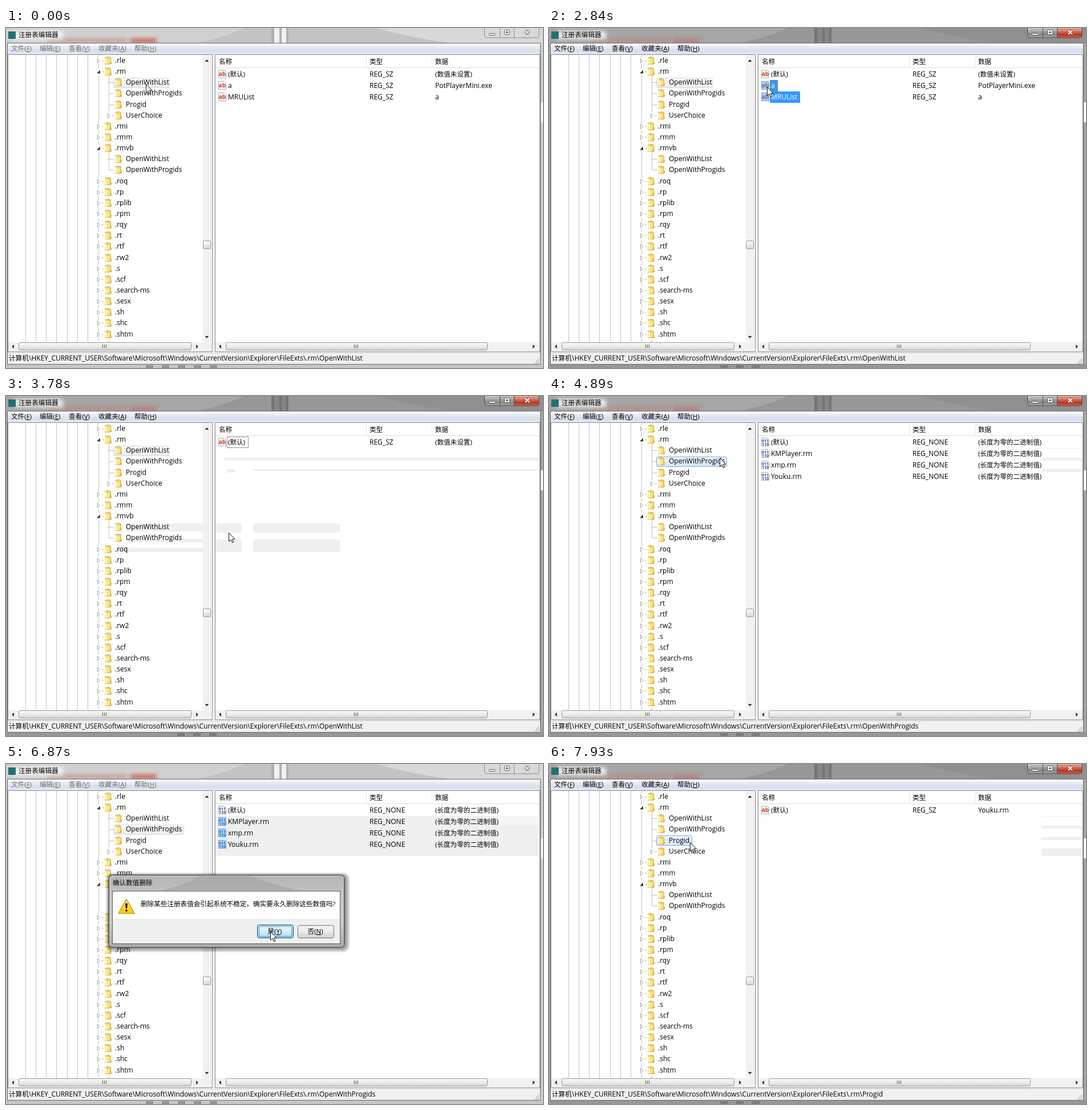
These frames come from a looping animation (941x595 px, 8000 ms). An HTML page:

```html
<!DOCTYPE html>
<html lang="zh">
<head>
<meta charset="utf-8">
<title>注册表编辑器</title>
<style>
html, body { margin: 0; width: 100%; height: 100%; overflow: hidden; background: #fff; }
svg { display: block; }
text { font-family: "Open Sans", "Noto Sans CJK SC", "Noto Sans CJK", sans-serif; font-size: 12px; fill: #000; white-space: pre; }
</style>
</head>
<body>
<svg id="stage" width="941" height="595" viewBox="0 0 941 595">
  <defs>
    <filter id="soft" x="-30%" y="-60%" width="160%" height="220%"><feGaussianBlur stdDeviation="3"/></filter>
  </defs>
  <g id="frame"></g>
  <g id="panes"></g>
  <g id="ghost"></g>
  <g id="mark"></g>
  <g id="tree"></g>
  <g id="list"></g>
  <g id="status"></g>
  <g id="dialog"></g>
  <path id="cursor" d="M.5 .5v15l3.5-3.3 2.5 5.3 2.3-1-2.4-5.2h4.6z" fill="#fff" stroke="#111" stroke-linejoin="round"/>
</svg>
<script>
const LOOP = 8000;
const $ = id => document.getElementById(id);

// ---- drawing helpers ----
const rect = (x, y, w, h, fill, extra = '') =>
  `<rect x="${x}" y="${y}" width="${w}" height="${h}" fill="${fill}" ${extra}/>`;
const box = (x, y, w, h, fill, stroke, r = 0) =>
  rect(x + .5, y + .5, w - 1, h - 1, fill, `stroke="${stroke}" rx="${r}"`);
const path = (d, fill, extra = '') => `<path d="${d}" fill="${fill}" ${extra}/>`;
const dots = d => path(d, 'none', 'stroke="#858585" stroke-dasharray="1 1"');
const text = (x, y, s, fill = '#000', extra = '') => {
  const size = /[\u4e00-\u9fff]/.test(s) ? 11.6 : 12;
  return `<text x="${x}" y="${y + 4}" style="font-size:${size}px;fill:${fill}" ${extra}>${s}</text>`;
};
const hotkey = s => s.replace(/\((\w)\)/, '(<tspan text-decoration="underline">$1</tspan>)');
const gradient = (id, ...stops) => {
  const list = stops.map((c, i) => `<stop offset="${i / (stops.length - 1)}" stop-color="${c}"/>`);
  return `<linearGradient id="${id}" x2="0" y2="1">${list.join('')}</linearGradient>`;
};

$('stage').querySelector('defs').insertAdjacentHTML('beforeend',
  gradient('menuFill', '#fbfcfe', '#e6ebf5', '#d6deed', '#e3e8f3') +
  gradient('thumb', '#f8f8f8', '#ececec', '#d3d3d3') +
  gradient('focus', '#edf5fe', '#d2e5fc') +
  gradient('blur', '#fafafa', '#ececec') +
  gradient('push', '#f4f4f4', '#ebebeb', '#d0d0d0') +
  gradient('pushHot', '#eaf6fd', '#d5effc', '#a9dbf5') +
  gradient('closeFill', '#e5a497', '#d27868', '#b8351f', '#d2603f') +
  gradient('glassBtn', '#c4c4c4', '#a8a8a8', '#868686', '#a4a4a4') +
  gradient('warn', '#ffe95a', '#fcc80c') +
  gradient('dialogGlass', '#b4b4b4', '#c6c6c6', '#c9c9c9', '#a5a5a5'));

// ---- window frame ----
function frame(active) {
  const tone = active
    ? { base: '#a6a6a6', wedge: '#979797', band: '#858585', edge: '#747474', right: '#8f8f8f', foot: '#979797', ink: '#000' }
    : { base: '#d0d0d0', wedge: '#c3c3c3', band: '#f1f1f1', edge: '#b0b0b0', right: '#d8d8d8', foot: '#c6c6c6', ink: '#6d6d6d' };
  let s = rect(0, 0, 941, 595, tone.base);
  s += path('M325 27Q375 20 418 0H650Q720 20 790 27z', tone.wedge);
  s += path('M650 0Q720 20 790 27H941V0z', tone.right);
  s += rect(465, 0, 30, 27, tone.edge) + rect(470, 0, 9, 27, tone.band) + rect(483, 0, 8, 27, tone.band);
  s += `<g filter="url(#soft)">` + rect(72, 18, 140, 8, '#b98078', 'opacity=".55"') +
    rect(218, 18, 46, 9, '#c9493f', `opacity="${active ? .4 : .7}"`) +
    rect(14, 5, 86, 15, '#fff', 'opacity=".7"') + '</g>';
  s += rect(0, 589, 941, 6, tone.foot);
  for (let x = active ? 300 : 245; x < 365; x += 28) s += rect(x, 590, 13, 5, '#555', 'opacity=".45"');
  s += rect(937, 130, 4, 35, '#f4f4f4');
  s += rect(4, 6, 13, 13, '#23706f') + text(22, 12, '注册表编辑器');

  const [line, fill] = active ? ['#4f4f4f', 'url(#glassBtn)'] : ['#8b8b8b', '#dadada'];
  s += path('M838.5 0V13q0 4 4 4H865.5V0', fill, `stroke="${line}"`);
  s += rect(865.5, -1, 25, 18, fill, `stroke="${line}"`);
  s += path('M890.5 0V17H930q4 0 4-4V0', active ? 'url(#closeFill)' : fill, `stroke="${line}"`);
  s += box(846, 9, 12, 4, '#fff', '#555', 1);
  s += box(873, 3, 10, 9, '#fff', '#555', 1) + box(876, 6, 4, 3, '#aaa', '#555');
  const cross = 'M910 4l7 7m0-7l-7 7';
  s += path(cross, 'none', 'stroke="#555" stroke-width="4"') + path(cross, 'none', 'stroke="#fff" stroke-width="2"');

  s += box(2, 26, 935, 563, '#f0f0f0', '#686868');
  s += rect(3, 27, 933, 19, 'url(#menuFill)') + rect(3, 46, 933, 1, '#f4f4f4');
  const menu = { 9: '文件(F)', 59: '编辑(E)', 110: '查看(V)', 162: '收藏夹(A)', 225: '帮助(H)' };
  for (const x in menu) s += text(+x, 36, menu[x], tone.ink).replace(/\(\w\)/, hotkey);
  return s;
}

// ---- panes, scroll bars, header ----
function arrow(x, y, turn) {
  return path('M-3.5 -2h7L0 2z', '#333', `transform="translate(${x} ${y}) rotate(${turn})"`);
}
function hbar(x, w, thumbX, thumbW, grip, end) {
  let s = rect(x, 550, w, 15, '#f1f1f1') + arrow(x + 8, 557.5, 90) + arrow(end, 557.5, -90);
  s += box(thumbX, 550, thumbW, 14, 'url(#thumb)', '#979797', 2);
  for (let i = 0; i < 3; i++) s += rect(grip + i * 3, 554, 1, 6, '#555');
  return s;
}
function panes() {
  let s = box(3, 46, 359, 521, '#fff', '#828790') + box(366, 46, 570, 521, '#fff', '#828790');
  s += rect(345, 47, 15, 503, '#f1f1f1') + arrow(352, 57, 180) + arrow(352, 541, 0);
  s += box(345, 372, 14, 15, 'url(#thumb)', '#979797', 2);
  s += hbar(4, 341, 22, 303, 169, 335) + rect(345, 550, 15, 16, '#f0f0f0');
  s += hbar(367, 568, 385, 459, 610, 925);
  s += text(373, 59, '名称') + text(637, 59, '类型') + text(752, 59, '数据');
  s += rect(631, 48, 1, 21, '#e3e6ea') + rect(746, 48, 1, 21, '#e3e6ea') + rect(367, 69, 568, 1, '#dcdcdc');
  s += rect(3, 568, 933, 1, '#d7d7d7');
  for (let i = 0; i < 3; i++)
    for (let j = 0; j <= i; j++) s += rect(932 - j * 3, 579 + i * 3, 2, 2, '#b8b8b8');
  return s;
}

// ---- key tree ----
const rowY = i => Math.round(57 + 19.14 * i);
const keys = ('.rle .rm >OpenWithList >OpenWithProgids >Progid >UserChoice .rmi .rmm .rmvb >OpenWithList ' +
  '>OpenWithProgids .roq .rp .rplib .rpm .rqy .rt .rtf .rw2 .s .scf .search-ms .sesx .sh .shc .shtm .shtml').split(' ');
const folder = (x, y) => `<g transform="translate(${x} ${y - 7})">` +
  path('M1.5 1.5L8 .5 11.5 2V13.5H1.5z', '#f0cf62', 'stroke="#d5b04a"') +
  path('M1 2L5.500 4V14L1 12.500z', '#fdf2b4') + path('M6 4H10V12H6z', '#f9e48d') +
  rect(10, 9, 3, 4, '#e3b93c') + '</g>';
function tree() {
  let s = '';
  for (let i = 0; i < 7; i++) s += dots(`M${Math.round(34 + i * 18.15) + .5} 48V549`);
  s += dots('M162.5 48V549') + dots(`M180.5 84V${rowY(5)}`) + dots(`M180.5 218V${rowY(10)}`);
  keys.forEach((key, i) => {
    const y = rowY(i), child = key[0] === '>', x = child ? 190 : 172;
    s += dots(`M${x - 10} ${y + .5}H${x}`);
    if (!child || key === '>UserChoice') {
      const open = keys[i + 1]?.[0] === '>' && !child;
      s += rect(x - 13, y - 5, 8, 11, '#fff');
      s += open ? path(`M${x - 7} ${y - 2.5}v6h-6z`, '#333')
        : path(`M${x - 11.5} ${y - 3.5}l4 4-4 4z`, '#fff', 'stroke="#a0a0a0"');
    }
    s += folder(x, y) + text(child ? 210 : 191, y, key.replace('>', ''));
  });
  return `<svg x="4" y="48" width="341" height="501" viewBox="4 48 341 501">${s}</svg>`;
}
const marks = { OpenWithList: [87, 99], OpenWithProgids: [106, 124], Progid: [125, 63] };
function mark(key, focus) {
  const [y, w] = marks[key];
  return focus ? box(188, y, w, 18, 'url(#focus)', '#84acdd', 2) : box(188, y, w, 18, 'url(#blur)', '#d9d9d9', 2);
}

// ---- value list ----
const none = name => [name, 'REG_NONE', '(长度为零的二进制值)'];
const unset = ['(默认)', 'REG_SZ', '(数值未设置)'];
const lists = {
  full: [unset, ['a', 'REG_SZ', 'PotPlayerMini.exe'], ['MRUList', 'REG_SZ', 'a']],
  empty: [unset],
  progids: ['(默认)', 'KMPlayer.rm', 'xmp.rm', 'Youku.rm'].map(none),
  progid: [['(默认)', 'REG_SZ', 'Youku.rm']]
};
const nameWidth = { a: 14, MRUList: 53, 'KMPlayer.rm': 78, 'xmp.rm': 49, 'Youku.rm': 60 };
function icon(y, binary, picked) {
  let s = path(`M372.5 ${y - 7.5}h10l3 3v11h-13z`, '#fff', 'stroke="#a9a9a9"');
  const label = (dy, t, c, size) => `<text x="379" y="${y + dy}" text-anchor="middle" style="font-size:${size}px;font-weight:700;fill:${c}">${t}</text>`;
  s += binary ? label(-.5, '011', '#2149a8', 7) + label(5.5, '110', '#2149a8', 7) : label(2.5, 'ab', '#d3361c', 10);
  return s + (picked ? rect(372, y - 8, 14, 15, '#3399ff', 'opacity=".45"') : '');
}
function list({ rows, picked, last, lit, dotted }) {
  return lists[rows].map(([name, type, data], i) => {
    const y = 81 + i * 20, on = picked.includes(i), blue = on && lit;
    let s = '';
    if (blue) s += rect(387, y - 10, nameWidth[name], 20, '#3399ff');
    if (blue && last === i) s += rect(387.5, y - 9.5, nameWidth[name] - 1, 19, 'none', 'stroke="#cc6600" stroke-dasharray="1 1"');
    if (dotted && !i) s += rect(387.5, 71.5, 37, 19, 'none', 'stroke="#222" stroke-dasharray="1 1"');
    return s + icon(y, type === 'REG_NONE', on) + text(389, y, name, blue ? '#fff' : '#000') +
      text(637, y, type) + text(752, y, data);
  }).join('');
}

// Faint bands left on the panes by the closing message box
const band = (x, y, x2, y2) => rect(x, y, x2 - x, y2 - y, '#efefef');
const rightBands = band(863, 91, 934, 92) + band(863, 108, 934, 113) + band(863, 128, 934, 133);
const ghosts = {
  none: '',
  first: band(383, 108, 934, 113) + band(387, 128, 401, 134) + band(433, 128, 934, 131) +
    [368, 433].map(x => band(x, 223, x < 400 ? 413 : 585, 239) + band(x, 251, x < 400 ? 413 : 585, 273)).join('') +
    band(210, 223, 345, 237) + band(210, 250, 345, 256) + band(188, 266, 345, 273),
  side: rightBands,
  rows: band(368, 91, 934, 161) + rect(863, 92, 71, 16, '#f6f6f6'),
  last: rightBands + band(863, 148, 934, 161)
};

// ---- message box ----
function dialog() {
  let s = '';
  for (let i = 6; i > 0; i--) s += rect(181 - i, 196 - i, 412 + i * 2.6, 125 + i * 2.4, '#000', `rx="${6 + i}" opacity=".09"`);
  s += box(180, 194, 413, 127, 'url(#dialogGlass)', '#222', 6);
  s += path('M270 221Q315 212 340 196H430Q470 214 520 221z', '#999', 'opacity=".45"');
  s += rect(181.5, 195.5, 410, 124, 'none', 'stroke="#e8e8e8" rx="5" opacity=".8"');
  s += box(186, 222, 400, 93, '#fff', '#5c5c5c') + rect(187, 272, 398, 42, '#f0f0f0') + rect(187, 272, 398, 1, '#dfdfdf');
  s += text(187, 208, '确认数值删除') + text(236, 245, '删除某些注册表值会引起系统不稳定。确实要永久删除这些数值吗?');
  s += path('M211 236.500L225 261.500H197z', 'url(#warn)', 'stroke="#c79a1c" stroke-width="1.5" stroke-linejoin="round"');
  s += path('M209 244h4l-1 9h-2z', '#111') + '<circle cx="211" cy="256.500" r="1.800" fill="#111"/>';
  s += box(440, 281, 64, 24, 'url(#pushHot)', '#2c628b', 3) + rect(441.5, 282.5, 61, 21, 'none', 'stroke="#48c5ee" rx="2"');
  s += rect(443.5, 284.5, 57, 17, 'none', 'stroke="#333" stroke-dasharray="1 1"');
  s += box(511, 282, 64, 23, 'url(#push)', '#707070', 3);
  const label = (x, t) => text(x, 293, t, '#000', 'text-anchor="middle"').replace(/\(\w\)/, hotkey);
  return s + label(471, '是(Y)') + label(542, '否(N)');
}

// ---- timeline ----
const events = [
  [0, { active: false, key: 'OpenWithList', focus: false, rows: 'full', picked: [], last: -1, lit: true, dotted: false, ghost: 'none', ask: false }],
  [1100, { active: true, focus: true }],
  [1870, { focus: false, picked: [2], last: 2 }],
  [2300, { picked: [1, 2], last: 1 }],
  [3120, { active: false, ask: true, lit: false }],
  [3640, { ask: false, rows: 'empty', picked: [], lit: true, ghost: 'first' }],
  [3780, { active: true, dotted: true }],
  [4610, { key: 'OpenWithProgids', focus: true, rows: 'progids', dotted: false, ghost: 'side' }],
  [5340, { focus: false, picked: [1, 2], last: 2 }],
  [5490, { picked: [1, 2, 3], last: 3 }],
  [6260, { active: false, ask: true, lit: false, ghost: 'rows' }],
  [7020, { ask: false, rows: 'progids', picked: [], lit: true, ghost: 'last' }],
  [7150, { active: true }],
  [7540, { key: 'Progid', focus: true, rows: 'progid' }]
];
// start, end, steps, target x, target y
const moves = [
  [270, 390, 2, 215, 98], [670, 670, 1, 228, 98], [1350, 1590, 3, 415, 122],
  [1870, 2440, 5, 383, 104], [2840, 2840, 1, 382, 103], [3250, 3510, 3, 463, 292],
  [3640, 3780, 2, 390, 239], [3900, 4020, 2, 290, 160], [4170, 4460, 3, 255, 111],
  [4750, 5190, 4, 430, 100], [5340, 5490, 2, 402, 143], [6410, 6870, 4, 463, 293],
  [7150, 7410, 3, 225, 134], [7670, 7800, 2, 370, 99], [7930, 7930, 1, 247, 137]
];
function pointer(t) {
  let x = 245, y = 98;
  for (const [from, to, n, tx, ty] of moves) {
    if (t < from) break;
    const gap = (to - from) / (n - 1 || 1) || 1;
    const k = Math.min(n, Math.floor((t - from) / gap + 1e-6) + 1) / n;
    x += (tx - x) * k;
    y += (ty - y) * k;
  }
  return [Math.round(x), Math.round(y)];
}
const stateAt = t => Object.assign({}, ...events.filter(([at]) => at <= t).map(e => e[1]));

const shown = {};
function put(id, html) {
  if (shown[id] === html) return;
  shown[id] = html;
  $(id).innerHTML = html;
}
const root = '\\HKEY_CURRENT_USER\\Software\\Microsoft\\Windows\\CurrentVersion\\Explorer\\FileExts\\.rm\\';
const start = performance.now();
put('panes', panes());
put('tree', tree());

function draw(now) {
  const t = Math.max(0, now - start) % LOOP;
  const s = stateAt(t);
  put('frame', frame(s.active));
  put('ghost', ghosts[s.ghost]);
  put('mark', mark(s.key, s.focus));
  put('list', list(s));
  put('status', text(5, 578, '计算机') + text(40, 578, root + s.key));
  put('dialog', s.ask ? dialog() : '');
  $('cursor').setAttribute('transform', `translate(${pointer(t)})`);
  requestAnimationFrame(draw);
}
draw(start);
</script>
</body>
</html>
```
